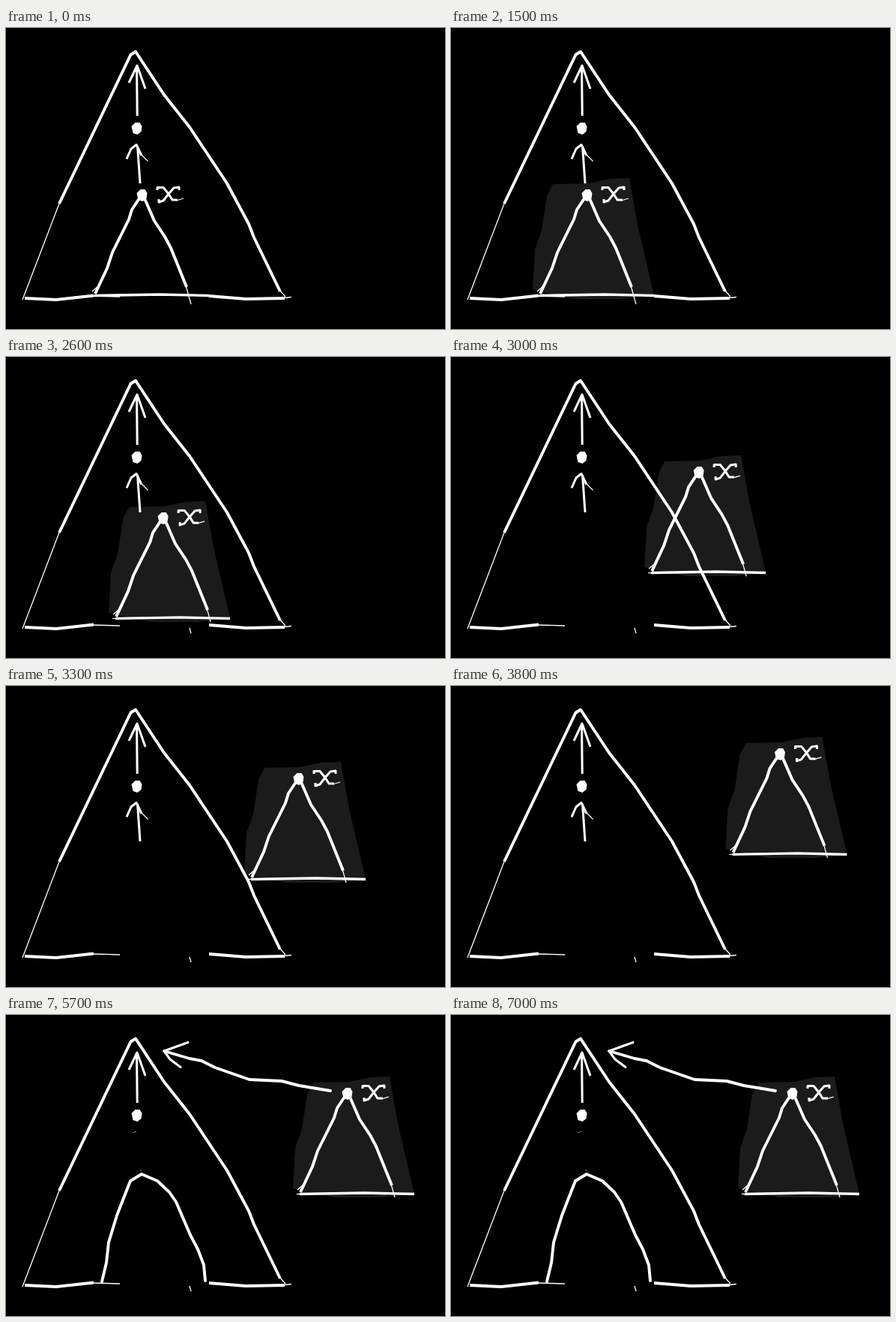
An HTML page for the animation above (7.2 s loop, 586 by 401 pixels).

```html
<!DOCTYPE html>
<html lang="en">
<head>
<meta charset="utf-8">
<title>Cutting a subtree</title>
<style>
  html, body { margin: 0; width: 100%; height: 100%; overflow: hidden; background: #000; }
  svg { display: block; width: 586px; height: 401px; }
  path { fill: none; stroke: #fff; stroke-width: 3.9; stroke-linejoin: round; }
  .mid { stroke-width: 3; }
  .thin { stroke-width: 1.3; }
  .drawn { stroke-linecap: round; stroke-dasharray: 1 2; }
  #blob { fill: #fff; stroke: none; }
  #lasso { fill: #1b1b1b; stroke: none; }
  #residue { stroke: #777; stroke-width: 1.2; }
</style>
</head>
<body>
<svg viewBox="0 0 586 401">
  <defs>
    <path id="blob" d="M-2 -8 4 -8 7 -3 6 4 1 8 -5 6 -7 -3Z"/>
  </defs>
  <path id="lasso" d="M136 208 184 207 212 201 238 200 249 262 271 356 230 361 165 361 109 349 112 295 121 270 128 224Z"/>

  <!-- outer tree -->
  <path d="M71 234 166.500 35.500 173 31.500 211 89 245 132 295 207 324 261 331 279 366 351"/>
  <path class="thin" d="M71 234 22 362M365 349 373 358M372 359.500 381 358.500"/>
  <path d="M25 360 67 362 117 356.500M271 357 320 361 372 360"/>
  <path class="thin" d="M115 357 152 358M245 361 247 368"/>

  <!-- path to the root -->
  <path class="mid" d="M175.200 117 174.500 50M164 73 175 50 186 81"/>
  <use href="#blob" x="174.500" y="134"/>
  <path id="shaft" class="mid" d="M179 207 175.500 157"/>
  <g id="head">
    <path class="mid" d="M161 174.500 167 161 174 155.500 181 170"/>
    <path class="thin" d="M180 168 189.500 177.500"/>
  </g>
  <path id="residue" d="M169 157 174 155M179 206 181 207"/>

  <!-- subtree of x -->
  <g id="piece">
    <path d="M119 354 135 320 142 299 164 255 168 242 180 224 184 225 198 257 212 278 220 293 241 345"/>
    <path class="thin" d="M240 343 245 361M115 351 123 344M114 356.500H130"/>
    <path style="stroke-width: 3.400" d="M118 356.500 205 355 271 356.500"/>
    <use href="#blob" x="181.500" y="223"/>
    <path class="mid" d="M202 216V212.500H210L217 221 210 230 204 232V228M231 216V212L224 213 217 221 222 229H229"/>
    <path class="thin" d="M227 230 237 227"/>
  </g>

  <path id="arc" class="drawn" pathLength="1" d="M128 355 134 330 137 303 148 267 166 221 181 212 202 221 218 236 227 249 246 293 256 312 264 333 266 354"/>
  <path id="link" class="drawn" pathLength="1" d="M433 101 391 94 368 88 325 86 279 70 261 61 245 58 211 48"/>
  <path id="tip" class="drawn mid" pathLength="1" d="M243 36.500 211 48 219 59 233 69.500"/>
</svg>
<script>
  const LOOP = 7200, STEP = 100;
  const $ = id => document.getElementById(id);
  const progress = (t, from, to) => Math.max(0, Math.min(1, (t - from) / (to - from)));
  const ease = k => k * k * (3 - 2 * k);

  // each leg eases the subtree to (x, y), optionally over an arch
  const legs = [
    { from: 1500, to: 1800, x: 24, y: -4 },
    { from: 1900, to: 2300, x: 20, y: -4 },
    { from: 2500, to: 3300, x: 209, y: -99 },
    { from: 3300, to: 4100, x: 280, y: -118, arch: 24 },
    { from: 4200, to: 4400, x: 273, y: -116 },
    { from: 5000, to: 5100, x: 274, y: -118 }
  ];

  function dragAt(t) {
    let x = 0, y = 0;
    for (const leg of legs) {
      const k = ease(progress(t, leg.from, leg.to));
      x += (leg.x - x) * k;
      y += (leg.y - y) * k - (leg.arch || 0) * Math.sin(Math.PI * k);
    }
    return `translate(${x} ${y})`;
  }

  function show(id, on) {
    $(id).style.visibility = on ? "visible" : "hidden";
  }

  function draw(id, t, from, to) {
    const k = progress(t, from, to);
    show(id, k > 0);
    $(id).style.strokeDashoffset = 1 - k;
  }

  function render(time) {
    const t = Math.floor(time % LOOP / STEP) * STEP;
    for (const id of ["piece", "lasso"]) $(id).setAttribute("transform", dragAt(t));
    show("lasso", t >= 1500);
    show("head", t < 5000);
    show("shaft", t < 5100);
    show("residue", t >= 5100);
    draw("arc", t, 4400, 4900);
    draw("link", t, 5100, 5500);
    draw("tip", t, 5500, 5700);
  }

  const start = performance.now();
  function tick() {
    render(performance.now() - start);
    requestAnimationFrame(tick);
  }
  tick();
</script>
</body>
</html>
```
